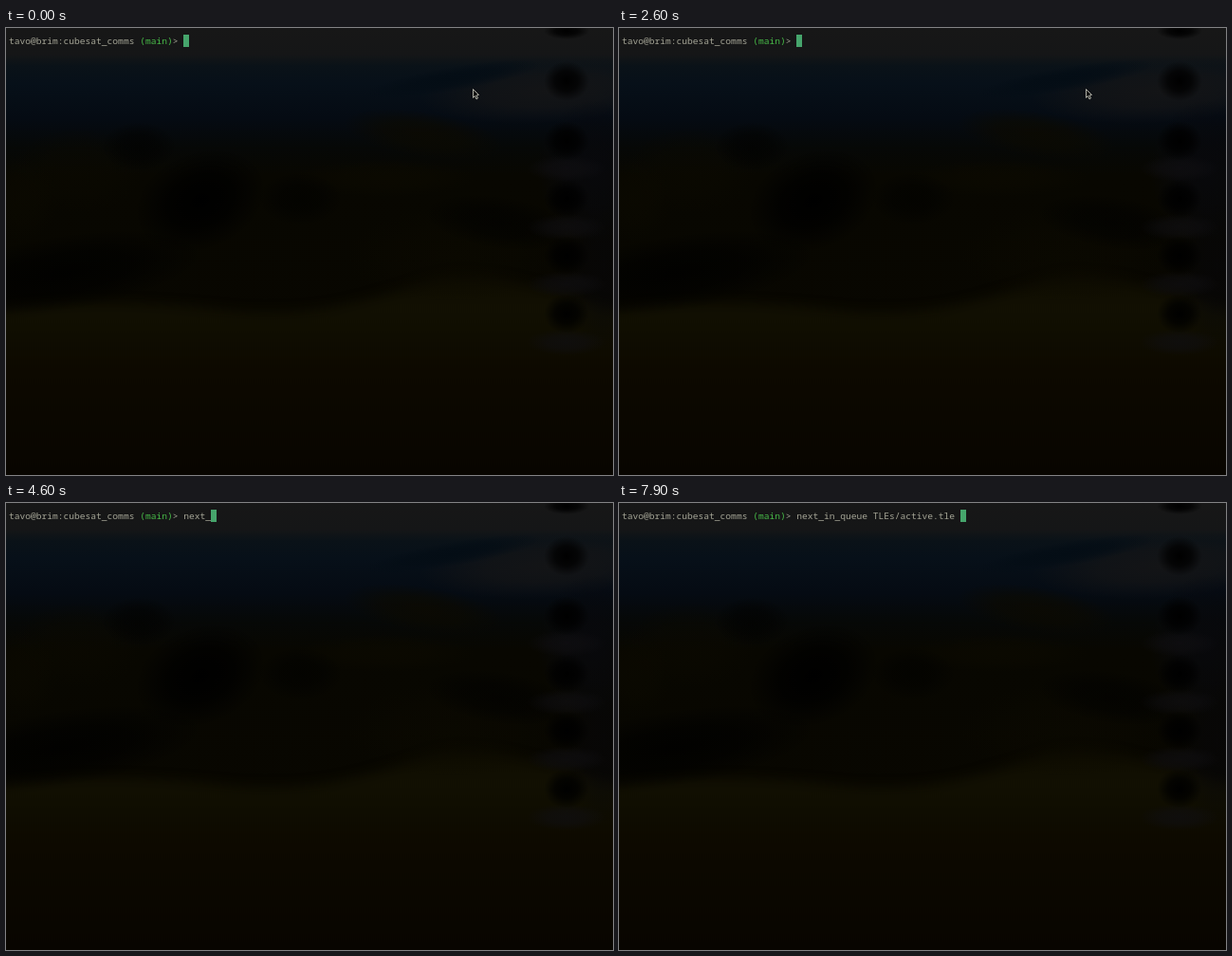
These frames come from a looping animation (640 px wide and 471 px high, 8 s). An HTML page with a canvas:

```html
<!DOCTYPE html>
<html>
<head>
<meta charset="utf-8">
<style>
html, body { margin: 0; width: 100%; height: 100%; overflow: hidden; background: #080703; }
canvas { display: block; }
</style>
</head>
<body>
<canvas id="stage" width="640" height="471"></canvas>
<script>
const W = 640, H = 471, LOOP = 8000, TYPING_START = 3000;
const ctx = document.getElementById('stage').getContext('2d');
const FONT = '9.6px "Noto Sans Mono", "Liberation Mono", monospace';
const TEXT = '#a5a596';
const PROMPT = [['tavo@brim:cubesat_comms ', TEXT], ['(main)', '#48bb48'], ['> ', TEXT]];
const COMMAND = 'next_in_queue TLEs/active.tle ';

// [time, characters typed]; equal neighbours are short pauses
const TYPING = [
  [3000, 1], [3200, 1], [4580, 5], [4700, 5], [5880, 14],
  [6000, 14], [6780, 17], [6900, 17], [7880, 30]
];

function verticalGradient(g, y0, y1, stops) {
  const grad = g.createLinearGradient(0, y0, 0, y1);
  for (const [y, color] of stops) grad.addColorStop((y - y0) / (y1 - y0), color);
  return grad;
}

function blob(g, x, y, rx, ry, rgb, alpha = 1, turn = 0) {
  g.save();
  g.translate(x, y);
  g.rotate(turn);
  g.scale(rx, ry);
  const grad = g.createRadialGradient(0, 0, 0, 0, 0, 1);
  grad.addColorStop(0, `rgba(${rgb},${alpha})`);
  grad.addColorStop(0.5, `rgba(${rgb},${alpha * 0.75})`);
  grad.addColorStop(1, `rgba(${rgb},0)`);
  g.fillStyle = grad;
  g.fillRect(-1, -1, 2, 2);
  g.restore();
}

// dim landscape: grey cloud, blue sky, dark trees and an olive meadow
function paintBackdrop() {
  const layer = document.createElement('canvas');
  layer.width = W;
  layer.height = H;
  const g = layer.getContext('2d');
  const cloud = '21,21,22', sky = '4,13,21', leaf = '12,10,1', black = '0,0,0';

  g.fillStyle = verticalGradient(g, 0, H, [
    [0, '#171717'], [28, '#151617'], [40, '#0a1218'], [58, '#071019'],
    [95, '#050b13'], [125, '#060807'], [155, '#080701'], [H, '#080600']
  ]);
  g.fillRect(0, 0, W, H);

  // meadow
  g.save();
  g.filter = 'blur(6px)';
  g.fillStyle = verticalGradient(g, 235, H, [
    [235, '#0b0900'], [295, '#121002'], [325, '#0f0d01'],
    [360, '#0d0900'], [H, '#080500']
  ]);
  g.beginPath();
  g.moveTo(-20, 300);
  g.bezierCurveTo(70, 284, 170, 290, 240, 298);
  g.bezierCurveTo(340, 306, 400, 280, 450, 264);
  g.bezierCurveTo(510, 250, 560, 275, 660, 300);
  g.lineTo(660, 491);
  g.lineTo(-20, 491);
  g.fill();
  g.restore();

  // cloud and sky at the upper right
  blob(g, 575, 66, 140, 34, cloud, 0.9, -0.06);
  blob(g, 470, 54, 95, 13, sky, 1, -0.17);
  blob(g, 620, 150, 60, 75, '8,9,14', 0.8);
  blob(g, 630, 250, 40, 90, '7,7,10', 0.6);

  // hills and foliage
  blob(g, 440, 112, 85, 24, leaf, 0.8, 0.15);
  blob(g, 400, 158, 95, 20, leaf, 0.7);
  blob(g, 75, 150, 70, 45, leaf, 0.5);
  blob(g, 15, 180, 40, 45, leaf, 0.6);
  blob(g, 470, 240, 110, 50, leaf, 0.5);

  // dark hollows
  blob(g, 205, 182, 72, 52, black, 1, -0.4);
  blob(g, 140, 125, 40, 26, '2,2,1', 0.7);
  blob(g, 60, 258, 150, 40, '1,1,0', 0.9, -0.15);
  blob(g, 310, 180, 45, 28, '2,2,0', 0.7);
  blob(g, 520, 205, 80, 28, '2,2,1', 0.7, 0.15);

  // icon column
  for (const y of [148, 210, 270, 331]) blob(g, 591, y, 42, 14, '16,15,18', 0.7);
  for (const y of [3, 56, 119, 180, 240, 301]) {
    blob(g, 591, y, 24, y < 10 ? 9 : 21, black, 1);
  }
  return layer;
}

function drawPointer() {
  ctx.beginPath();
  ctx.moveTo(492.5, 64.5);
  for (const [x, y] of [[492.5, 73.5], [494.5, 71.5], [496, 75], [497.5, 74], [496, 71], [498.5, 70.5]]) {
    ctx.lineTo(x, y);
  }
  ctx.closePath();
  ctx.fillStyle = '#101010';
  ctx.fill();
  ctx.lineWidth = 0.9;
  ctx.strokeStyle = '#c4c4b8';
  ctx.stroke();
}

function typedCount(t) {
  if (t < TYPING_START) return 0;
  const next = TYPING.findIndex(([time]) => time > t);
  if (next < 0) return COMMAND.length;
  const [t0, n0] = TYPING[next - 1], [t1, n1] = TYPING[next];
  return Math.floor(n0 + (n1 - n0) * (t - t0) / (t1 - t0));
}

// half-second blink until typing keeps the block lit
function caretVisible(t) {
  return t >= 2600 || Math.floor((t + 400) / 500) % 2 === 0;
}

const backdrop = paintBackdrop();

function render(t) {
  ctx.drawImage(backdrop, 0, 0);
  ctx.font = FONT;
  ctx.textBaseline = 'alphabetic';
  let x = 3;
  for (const [text, color] of [...PROMPT, [COMMAND.slice(0, typedCount(t)), TEXT]]) {
    ctx.fillStyle = color;
    ctx.fillText(text, x, 17);
    x += ctx.measureText(text).width;
  }
  if (caretVisible(t)) {
    ctx.fillStyle = '#46a56c';
    ctx.fillRect(Math.round(x), 7, 6, 13);
  }
  if (t < TYPING_START) drawPointer();
}

const start = performance.now();
function tick() {
  render((performance.now() - start) % LOOP);
  requestAnimationFrame(tick);
}
tick();
</script>
</body>
</html>
```
